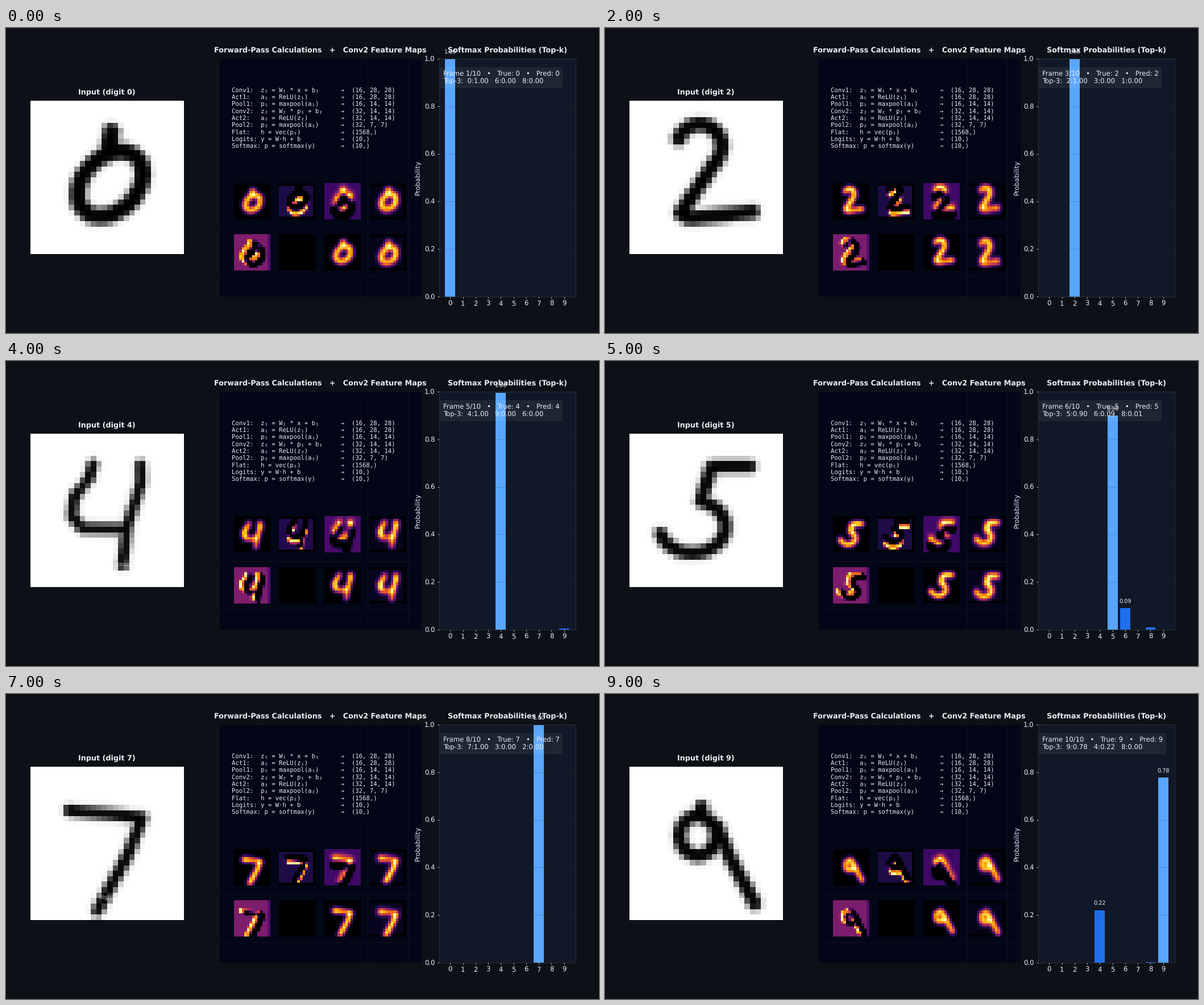
These frames come from a looping animation (1043 px wide and 537 px high, 10000 ms). A matplotlib script:

```python
import numpy as np
import matplotlib.pyplot as plt
from matplotlib.animation import FuncAnimation

W, H, DPI = 1043, 537, 64
PT = 72 / DPI  # points per pixel
BG, PANEL, CODE_BG = "#0d1117", "#111827", "#020617"
INK, TOP, BAR, LINE = "#e6edf3", "#58a6ff", "#1f6feb", "#30363d"
TITLE, BODY, MONO, SMALL = (px * PT for px in (12.7, 11.68, 10.65, 9.65))

plt.rcParams.update({
    "font.family": "DejaVu Sans",
    "text.hinting": "none",
    "text.color": INK,
})

STEPS = [
    ("Conv1:  z₁ = W₁ * x + b₁", "(16, 28, 28)"),
    ("Act1:   a₁ = ReLU(z₁)", "(16, 28, 28)"),
    ("Pool1:  p₁ = maxpool(a₁)", "(16, 14, 14)"),
    ("Conv2:  z₂ = W₂ * p₁ + b₂", "(32, 14, 14)"),
    ("Act2:   a₂ = ReLU(z₂)", "(32, 14, 14)"),
    ("Pool2:  p₂ = maxpool(a₂)", "(32, 7, 7)"),
    ("Flat:   h = vec(p₂)", "(1568,)"),
    ("Logits: y = W·h + b", "(10,)"),
    ("Softmax: p = softmax(y)", "(10,)"),
]

# Chances of the wrong classes; the right one takes the rest.
RIVALS = [
    {6: 2e-4, 8: 1e-4},
    {6: 2e-4, 4: 1e-4},
    {3: 2e-4, 1: 1e-4},
    {2: 0.34, 6: 0.142, 8: 0.074, 4: 0.004, 7: 0.002},
    {9: 0.004, 6: 2e-4},
    {6: 0.09, 8: 0.01},
    {0: 0.01, 8: 0.0035, 4: 0.002},
    {3: 2e-4, 2: 1e-4},
    {9: 0.011, 2: 0.007, 4: 0.002, 0: 0.001, 6: 0.001},
    {4: 0.22, 8: 0.002, 6: 0.001},
]


def arc(cx, cy, rx, ry, start=0, end=360, tilt=0):
    """Ellipse arc in degrees, clockwise from the right."""
    a = np.radians(np.linspace(start, end, 90))
    t = np.radians(tilt)
    x, y = rx * np.cos(a), ry * np.sin(a)
    return np.column_stack([cx + x * np.cos(t) - y * np.sin(t),
                            cy + x * np.sin(t) + y * np.cos(t)])


def line(*points):
    p = np.array(points, float)
    t = np.linspace(0, len(p) - 1, 30 * len(p))
    k = np.arange(len(p))
    return np.column_stack([np.interp(t, k, p[:, 0]), np.interp(t, k, p[:, 1])])


def shift(a, dy, dx):
    """Move the grid by whole cells, filling with zeros."""
    h, w = a.shape
    return np.pad(a, 3)[3 - dy:3 - dy + h, 3 - dx:3 - dx + w]


def blur(a, k):
    a = (1 - 2 * k) * a + k * (shift(a, 1, 0) + shift(a, -1, 0))
    return (1 - 2 * k) * a + k * (shift(a, 0, 1) + shift(a, 0, -1))


def pen(half, *strokes):
    """Ink on a 28 x 28 grid for a pen of the given half width."""
    path = np.vstack(strokes)
    c = np.arange(28) + 0.5
    gx, gy = np.meshgrid(c, c)
    dist = np.hypot(gx[..., None] - path[:, 0], gy[..., None] - path[:, 1]).min(-1)
    return blur(np.clip((half + 0.5 - dist) / 1.05, 0, 1), 0.055)


def write_digits():
    return [
        pen(1.55, arc(14.6, 15.2, 6.8, 4.9, tilt=-45), line((14.8, 5.6), (14.2, 9))),
        pen(1.05, line((17.7, 5), (12.2, 22.7))),
        pen(1.35, arc(12.8, 8.3, 4, 4, 200, 400),
            line((15.9, 10.9), (9.3, 20.5), (11, 21.5), (22.5, 20.3))),
        pen(1.2, line((6.2, 12.2), (6.2, 9)), arc(9.6, 9, 3.4, 4.1, 180, 300),
            line((11.3, 5.4), (14.5, 8), (17, 12.5)), line((9.8, 12.7), (18, 13.2)),
            arc(17.5, 17.6, 6.1, 4.4, -85, 90),
            line((17.5, 22), (13, 21.7), (9.7, 17.8))),
        pen(1.0, line((11.4, 5.6), (10.8, 8), (8, 11.5), (7.6, 15), (9.4, 17.3),
                      (17, 17.4)),
            line((20.1, 5.7), (20.2, 9), (17.6, 17), (16.8, 24))),
        pen(1.2, line((22, 6), (15, 6), (13, 12.3)), arc(11.5, 17, 6, 4.8, -70, 165)),
        pen(1.05, line((13, 3.7), (11.4, 4.2), (9, 9), (8.2, 14.5)),
            arc(15.4, 14.5, 7.2, 6.9, -30, 180), arc(19.5, 16, 7.1, 5.4, -65, -200),
            line((12.8, 17.8), (14.4, 18.4))),
        pen(1.1, line((7, 8), (20.4, 9.3), (17.8, 16), (12.2, 26.3))),
        pen(1.15, line((15.2, 14.8), (10.7, 11), (11.3, 7.8), (14, 6.7), (21, 6.7),
                       (22.8, 8.5), (22.6, 10.8), (15.2, 15), (16.4, 18)),
            arc(10.7, 18.4, 5.9, 2.3, tilt=-10)),
        pen(1.25, arc(12.5, 12.6, 3.3, 3.6),
            line((13.1, 7.3), (13.1, 9), (16, 11), (18.3, 16.5), (22.9, 25))),
    ]


def feature_maps(ink):
    """Hand-made filters: blobs, lower, upper and left edges."""
    p = ink.reshape(14, 2, 14, 2).max((1, 3))
    soft = blur(p, 0.25)
    field = np.zeros((14, 14))
    field[1:13, :13] = 1
    blob = soft ** 1.2
    lower = field * (0.13 + shift(p, 1, 0) - 0.35 * p - shift(p, -1, 0))
    upper = 0.24 + 0.8 * shift(soft, -1, 0) + 0.35 * p - 1.4 * shift(soft, 2, 0)
    slant = 0.06 * field + 0.5 * soft + 0.5 * shift(soft, -1, 0)
    left = 0.4 + 0.8 * shift(p, 0, -1) - 0.4 * p - 0.8 * shift(p, 1, 1)
    left[:, -1] *= 0.7
    maps = [blob, lower, upper, slant ** 1.2, left, 0 * p, blob,
            0.04 * field + 0.6 * blob + 0.4 * shift(blob, 1, 0)]
    return [np.maximum(m, 0) / max(m.max(), 1e-6) for m in maps]


def add_axes(x0, y0, x1, y1, **kw):
    return fig.add_axes([x0 / W, 1 - y1 / H, (x1 - x0) / W, (y1 - y0) / H], **kw)


def image(x0, y0, size, n, cmap):
    ax = add_axes(x0, y0, x0 + size, y0 + size)
    ax.axis("off")
    return ax.imshow(np.zeros((n, n)), cmap=cmap, vmin=0, vmax=1,
                     interpolation="nearest", aspect="auto")


def label(x, y, s, size, **kw):
    return fig.text(x / W, 1 - y / H, s, fontsize=size, **kw)


def heading(x, y, s=""):
    return label(x, y, s, TITLE, weight="bold", ha="center")


fig = plt.figure(figsize=(W / DPI, H / DPI), dpi=DPI, facecolor=BG)

# Input
digit_im = image(42.6, 128.1, 270, 28, "gray_r")
digit_title = heading(177.5, 117)
label(178, 360.5, "Preview ↑  (light smoothing)", SMALL, ha="center",
      color="white", alpha=0.7)

# Calculations and feature maps
calc = add_axes(375, 54, 731, 473, facecolor=CODE_BG)
calc.set(xlim=(375, 731), ylim=(473, 54), xticks=[], yticks=[])
grid = dict(color=LINE, lw=0.8 * PT, alpha=0.3)
for x in (636, 707):
    calc.axvline(x, **grid)
for y in (353, 437):
    calc.axhline(y, **grid)
heading(553, 43, "Forward-Pass Calculations   +   Conv2 Feature Maps")
for i, (left, shape) in enumerate(STEPS):
    label(397, 112.2 + 12.36 * i, f"{left:<30}→  {shape}", MONO,
          family="DejaVu Sans Mono")
map_ims = [image(400.5 + 79.7 * c, y, 64, 14, "inferno")
           for y in (273.3, 363) for c in range(4)]

# Probabilities
prob = add_axes(761.5, 54, 1001.5, 473, facecolor=PANEL)
bars = prob.bar(range(10), [0] * 10, width=0.8)
prob.set(xlim=(-0.89, 9.89), ylim=(0, 1), xticks=range(10))
prob.grid(axis="y", **grid)
prob.tick_params(color=INK, labelcolor=INK, labelsize=BODY, length=3.4 * PT,
                 pad=3.4 * PT, width=0.8 * PT)
for ax, color in ((calc, "#0a0f1c"), (prob, LINE)):
    for spine in ax.spines.values():
        spine.set(color=color, linewidth=0.8 * PT)
values = [prob.text(k, 0, "", fontsize=SMALL, ha="center") for k in range(10)]
info = prob.text(0.031, 0.95, "", fontsize=BODY, va="top", transform=prob.transAxes,
                 bbox=dict(boxstyle="square,pad=0.48", fc=(1, 1, 1, 0.06), ec="none"))
heading(881.5, 43, "Softmax Probabilities (Top-k)")
label(730, 263.5, "Probability", BODY, rotation=90, ha="right", va="center")

inks = write_digits()
maps = [feature_maps(ink) for ink in inks]


def update(n):
    digit_im.set_data(inks[n])
    digit_title.set_text(f"Input (digit {n})")
    for im, m in zip(map_ims, maps[n]):
        im.set_data(m)
    probs = {n: 1 - sum(RIVALS[n].values()), **RIVALS[n]}
    ranked = sorted(probs, key=probs.get, reverse=True)
    for k, (bar, text) in enumerate(zip(bars, values)):
        p = probs.get(k, 0)
        bar.set_height(p)
        bar.set_facecolor(TOP if k == ranked[0] else BAR)
        text.set_y(p + 9.5 / 419)
        text.set_text(f"{p:.2f}" if p >= 0.05 else "")
    top = "   ".join(f"{k}:{probs[k]:.2f}" for k in ranked[:3])
    info.set_text(f"Frame {n + 1}/10   •   True: {n}   •   Pred: {ranked[0]}\n"
                  f"Top-3:  {top}")
    return []


anim = FuncAnimation(fig, update, frames=10, init_func=lambda: update(0),
                     interval=1000, repeat=True, repeat_delay=0, blit=False)
plt.show()
```
